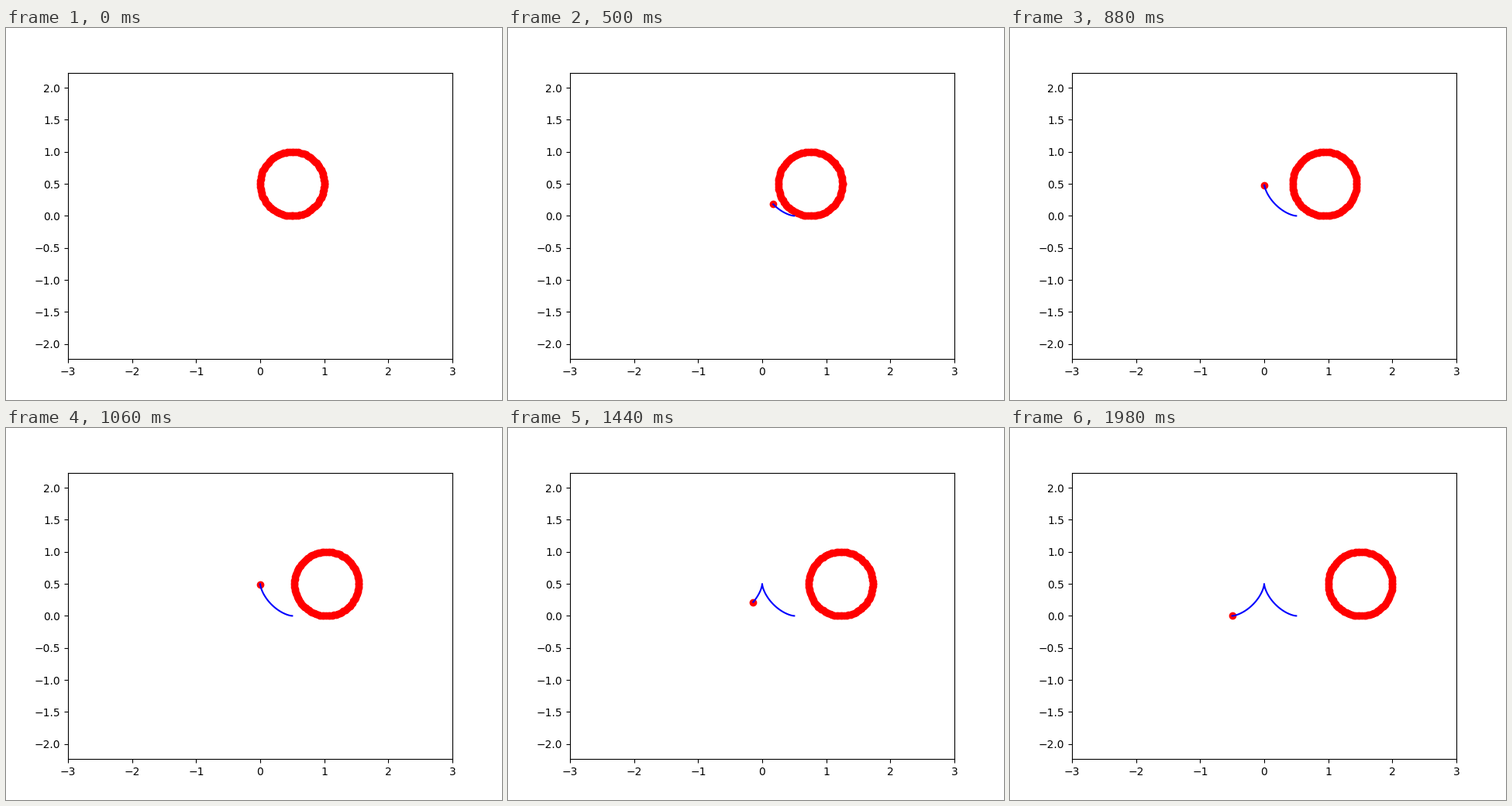
Animation, 640 px wide and 480 px high, one loop 2000 ms. Source, as a matplotlib script:

```python
import numpy as np
import matplotlib.pyplot as plt
from matplotlib.animation import FuncAnimation

FRAMES = 100
RADIUS = 0.5

fig, ax = plt.subplots(figsize=(6.4, 4.8), dpi=100)
half_height = 3 * 369.6 / 496  # equal scale on both axes
ax.set_xlim(-3, 3)
ax.set_ylim(-half_height, half_height)

t = np.linspace(0, np.pi, FRAMES)
path_x = RADIUS * np.cos(t) ** 3
path_y = RADIUS * np.sin(t) ** 3

ring_x = RADIUS * np.cos(2 * t)
ring_y = RADIUS + RADIUS * np.sin(2 * t)
centers = np.linspace(0.5, 1.5, FRAMES)

ring, = ax.plot([], [], "ro")
dot, = ax.plot([], [], "ro")
trail, = ax.plot([], [], "b-")


def update(i):
    ring.set_data(centers[i] + ring_x, ring_y)
    dot.set_data([path_x[i]], [path_y[i]])
    trail.set_data(path_x[:i + 1], path_y[:i + 1])
    return ring, dot, trail


anim = FuncAnimation(fig, update, frames=FRAMES, interval=20,
                     repeat=True, repeat_delay=0)
plt.show()
```
